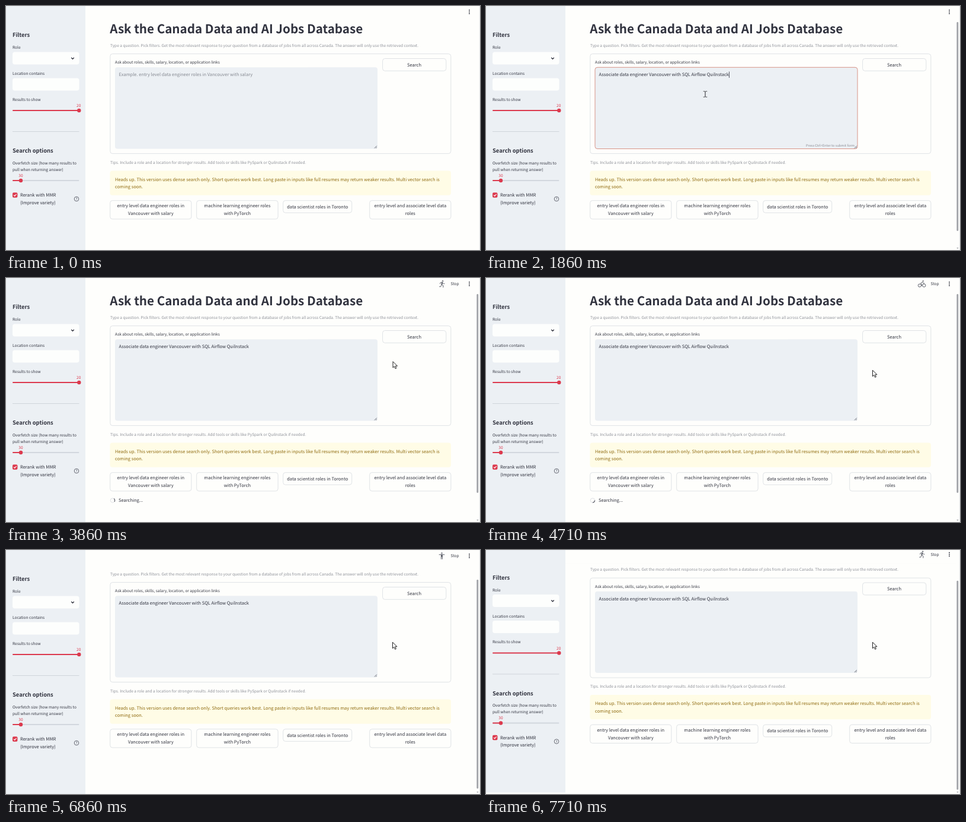
Recreate the animation shown at these times as an HTML page. Size 800 by 411 pixels, loop 8000 ms.

```html
<!DOCTYPE html>
<html lang="en">
<head>
<meta charset="utf-8">
<style>
html, body { margin: 0; width: 100%; height: 100%; overflow: hidden; background: #fefefc; }
svg { display: block; width: 800px; height: 411px; }
text {
  font: 7.5px "Noto Sans CJK JP", "Noto Sans CJK SC", "Noto Sans CJK", "Open Sans", sans-serif;
  fill: #31333f; text-rendering: geometricPrecision; white-space: pre;
}
.small { font-size: 6.56px; }
.tiny { font-size: 5.63px; }
.head { font-size: 9.4px; font-weight: 600; }
.title { font-size: 20.6px; font-weight: 700; }
.mid { text-anchor: middle; }
.grey { fill: #8c8f97; }
.red { fill: #dc3a4e; }
.warn { fill: #8f6b10; }
.box { fill: #fefefc; stroke: #d9dce0; stroke-width: .8; }
.field { fill: #fdfefd; }
.line { fill: none; stroke: #31333f; }
.cursor { stroke-linejoin: round; }
</style>
</head>
<body>
<svg viewBox="0 0 800 411">
<g id="page">
  <rect width="134" height="411" fill="#ecf0f4"/>
  <text class="head" x="11" y="52">Filters</text>
  <text class="small" x="11" y="72">Role</text>
  <rect class="field" x="11" y="77.5" width="112.5" height="21" rx="4"/>
  <path class="line" d="M110.2 87l2.3 2.3 2.3-2.3" stroke-width="1.3"/>
  <text class="small" x="11" y="116">Location contains</text>
  <rect class="field" x="11" y="121.5" width="112.5" height="21" rx="4"/>
  <text class="small" x="11" y="159.5">Results to show</text>
  <text class="small mid red" x="122.7" y="170">20</text>
  <rect class="red" x="11" y="175" width="112" height="2" rx="1"/>
  <circle class="red" cx="123.3" cy="176" r="3.2"/>
  <path d="M11 211.5H123.5" stroke="#d0d5db"/>
  <text class="head" x="11" y="247">Search options</text>
  <text class="small" x="11" y="266.5">Overfetch size (how many results to</text>
  <text class="small" x="11" y="277.5">pull when returning answer)</text>
  <text class="small mid red" x="25" y="287.5">30</text>
  <rect x="11" y="293" width="112.5" height="2" rx="1" fill="#d2d7de"/>
  <rect class="red" x="11" y="293" width="14" height="2" rx="1"/>
  <circle class="red" cx="25" cy="294" r="3.2"/>
  <rect class="red" x="11" y="314.3" width="8.4" height="8.4" rx="2"/>
  <path d="M13 318.5l1.7 1.7 2.9-3.4" fill="none" stroke="#fff" stroke-width="1.1"/>
  <text x="24" y="321.3">Rerank with MMR</text>
  <text x="24" y="333.7">(Improve variety)</text>
  <circle class="line" cx="119" cy="325" r="3.8" stroke-width=".7"/>
  <text class="tiny mid" x="119" y="327.2">?</text>

  <g id="main">
    <text class="title" x="175.3" y="46">Ask the Canada Data and AI Jobs Database</text>
    <text class="small grey" x="176" y="68.5">Type a question. Pick filters. Get the most relevant response to your question from a database of jobs from all across Canada. The answer will only use the retrieved context.</text>
    <rect class="box" x="175.8" y="80.6" width="575" height="168" rx="4"/>
    <text class="small" x="184" y="97.4">Ask about roles, skills, salary, location, or application links</text>
    <rect id="area" x="184" y="103.3" width="443" height="137.2" rx="4" fill="#ecf0f4" stroke-width=".9"/>
    <text id="query" x="190.6" y="118.2"></text>
    <path id="caret" d="M0 110.5V121" stroke="#31333f" stroke-width=".8"/>
    <text id="hint" class="tiny grey" x="622" y="237" text-anchor="end">Press Ctrl+Enter to submit form</text>
    <path class="line" d="M621.8 239.6l4-4M624.2 239.6l1.6-1.6" stroke-width=".7"/>
    <rect id="search" class="box" x="635.6" y="88.5" width="107.2" height="20.8" rx="4"/>
    <text class="mid" x="689" y="101.6">Search</text>
    <text class="small grey" x="176" y="265.8">Tips. Include a role and a location for stronger results. Add tools or skills like PySpark or Quilnstack if needed.</text>
    <rect x="175.5" y="277.5" width="575.5" height="41.3" rx="4" fill="#fffce6"/>
    <text class="warn" x="184" y="294.6">Heads up. This version uses dense search only. Short queries work best. Long paste in inputs like full resumes may return weaker results. Multi vector search is</text>
    <text class="warn" x="184" y="307.1">coming soon.</text>
    <g id="samples"></g>
    <g id="busy">
      <circle class="line" cx="180" cy="374.6" r="3.7" style="stroke:#dfe1e5"/>
      <path id="spin" class="line" d="M183.7 374.6a3.7 3.7 0 0 1-3.7 3.7"/>
      <text x="190" y="377.2">Searching...</text>
    </g>
  </g>

  <rect x="134" width="660" height="25" fill="#fefefc"/>
  <g fill="#31333f"><circle cx="782" cy="7" r=".95"/><circle cx="782" cy="9.9" r=".95"/><circle cx="782" cy="12.8" r=".95"/></g>
  <g id="running">
    <text class="small" x="750.5" y="12.4">Stop</text>
    <g transform="translate(735.5 10)" fill="none" stroke="#5d606a" stroke-width="1">
      <g id="bike"><circle cx="-3.6" cy="2.6" r="2.6"/><circle cx="3.8" cy="2.6" r="2.6"/><circle cx="2.2" cy="-4.8" r=".8"/><path d="M0 3.4V.6L-2-1 1-3.2 2.6-1.2H4.6"/></g>
      <g id="stand"><circle cy="-4.6" r=".9"/><path d="M-4.8-2.2H4.8M-1 5.6V-1M1 5.6V-1"/><path d="M0-2V1.6" stroke-width="2.6"/></g>
      <g id="run"><circle cx="1.6" cy="-4.8" r=".9"/><path d="M-3.2-.2L-1.8-2.6H1L3-.4H4.8M-4.2 4.6H-1.8L-.4 1.4M-.2 1L2.4 2.8V6"/><path d="M1-2.6L-.4 1.4" stroke-width="2"/></g>
    </g>
  </g>
</g>
<path d="M799.3 0V411" stroke="#e6e8ea"/>
<g id="bar" fill="#a1a3a8"><rect id="thumb" x="794.4" width="2.8" rx="1.4"/><path d="M794.2 407h3.4l-1.7 2z"/></g>
<g id="cursors" class="cursor">
  <path id="beam" d="M-3.4-5.6H-.9L0-4.8.9-5.6H3.4V-4H.9V4H3.4V5.6H.9L0 4.8-.9 5.6H-3.4V4H-.9V-4H-3.4z" fill="#3a3c44" stroke="#f5f6f7" stroke-width=".6"/>
  <path id="hand" d="M-1.1 .6Q0-.9 1.1 .6V4L4.4 4.7Q6.2 5.2 6 7L5.2 11.5H-.3L-3.4 7.4Q-3.4 5.6-1.1 7z" fill="#fff" stroke="#222" stroke-width="1"/>
  <path id="arrow" d="M0 0V10.4L2.4 8.2 4.1 12 5.9 11.2 4.2 7.5H7.5z" fill="#fff" stroke="#222" stroke-width="1"/>
</g>
</svg>
<script>
const $ = id => document.getElementById(id);
const show = (id, on) => $(id).style.display = on ? '' : 'none';
const move = (id, x, y) => $(id).setAttribute('transform', `translate(${x} ${y})`);

const samples = [
  [175.7, 137.2, 'entry level data engineer roles in', 'Vancouver with salary'],
  [321.7, 137.4, 'machine learning engineer roles', 'with PyTorch'],
  [467.7, 116, 'data scientist roles in Toronto'],
  [613.7, 137.2, 'entry level and associate level data', 'roles']
];
$('samples').innerHTML = samples.map(([x, w, ...lines]) =>
  `<rect class="box" x="${x}" y="327.7" width="${w}" height="${lines[1] ? 31.2 : 20.6}" rx="4"/>` +
  lines.map((s, i) => `<text class="mid" x="${x + w / 2}" y="${(lines[1] ? 339.3 : 340.7) + i * 13}">${s}</text>`).join('')
).join('');

const QUERY = 'Associate data engineer Vancouver with SQL Airflow Quilnstack';
const EXAMPLE = 'Example. entry level data engineer roles in Vancouver with salary';
const RATE = 7, LOOP = 8000;
const FOCUS = 5, PASTE = 9, CLICK = 23, SEND = 25, DONE = 39, SCROLL = 48;
const poses = ['bike', 'bike', 'run', 'run', 'stand', 'run', 'stand', 'stand'];

// Each key is [step, value, ...]; values are interpolated between keys.
function along(keys, n) {
  const i = keys.findIndex(k => k[0] > n);
  if (i < 0) return keys[keys.length - 1].slice(1);
  if (i === 0) return keys[0].slice(1);
  const a = keys[i - 1], b = keys[i], u = (n - a[0]) / (b[0] - a[0]), e = u * u * (3 - 2 * u);
  return a.slice(1).map((v, j) => v + (b[j + 1] - v) * e);
}
const pointer = [[1, 430, 400], [5, 370, 148.5], [17, 370, 148.5], [22, 654.5, 99], [25, 654.5, 99], [28, 652.5, 155.3]];
const scroll = [[47, 0, 0], [48, 26, 0], [50, 31, 0], [52, 31, 2.5]];

function draw(n) {
  const [x, y] = along(pointer, n), [off, lift] = along(scroll, n);
  move('page', 0, -lift);
  move('main', 0, -off);

  const pasted = n >= PASTE, focused = n >= FOCUS && n < SEND;
  const query = $('query');
  query.textContent = pasted ? QUERY : EXAMPLE;
  query.style.fill = pasted ? '' : '#868a92';
  $('area').setAttribute('stroke', focused ? '#d58a7c' : 'none');
  show('hint', pasted && n < CLICK);
  show('caret', focused && n < CLICK && (n + 3) % 8 < 4);
  move('caret', pasted ? 191.2 + query.getComputedTextLength() : 191, 0);

  const inArea = x > 184 && x < 627 && y > 103 && y < 240;
  const onButton = x > 635 && x < 743 && y > 88 && y < 110;
  $('search').style.fill = onButton ? '#e1e7ed' : '';
  $('search').style.stroke = onButton ? '#ccd4dc' : '';
  show('cursors', n >= 1);
  move('cursors', x, y);
  show('beam', inArea);
  show('hand', onButton);
  show('arrow', !inArea && !onButton);

  const busy = n > SEND && n < DONE;
  show('busy', busy);
  $('spin').setAttribute('transform', `rotate(${(n - 33) * 69} 180 374.6)`);
  show('running', n > SEND);
  const pose = poses[(n + 7) % 8];
  for (const id of ['bike', 'stand', 'run']) show(id, id === pose);

  show('bar', n >= 1);
  $('thumb').setAttribute('y', 27 + off * .88 - lift);
  $('thumb').setAttribute('height', busy ? 335 : 352);
}

let last = -1;
function tick() {
  const n = Math.floor((performance.now() % LOOP + 5) * RATE / 1000) % (LOOP * RATE / 1000);
  if (n !== last) draw(last = n);
  requestAnimationFrame(tick);
}
tick();
</script>
</body>
</html>
```
